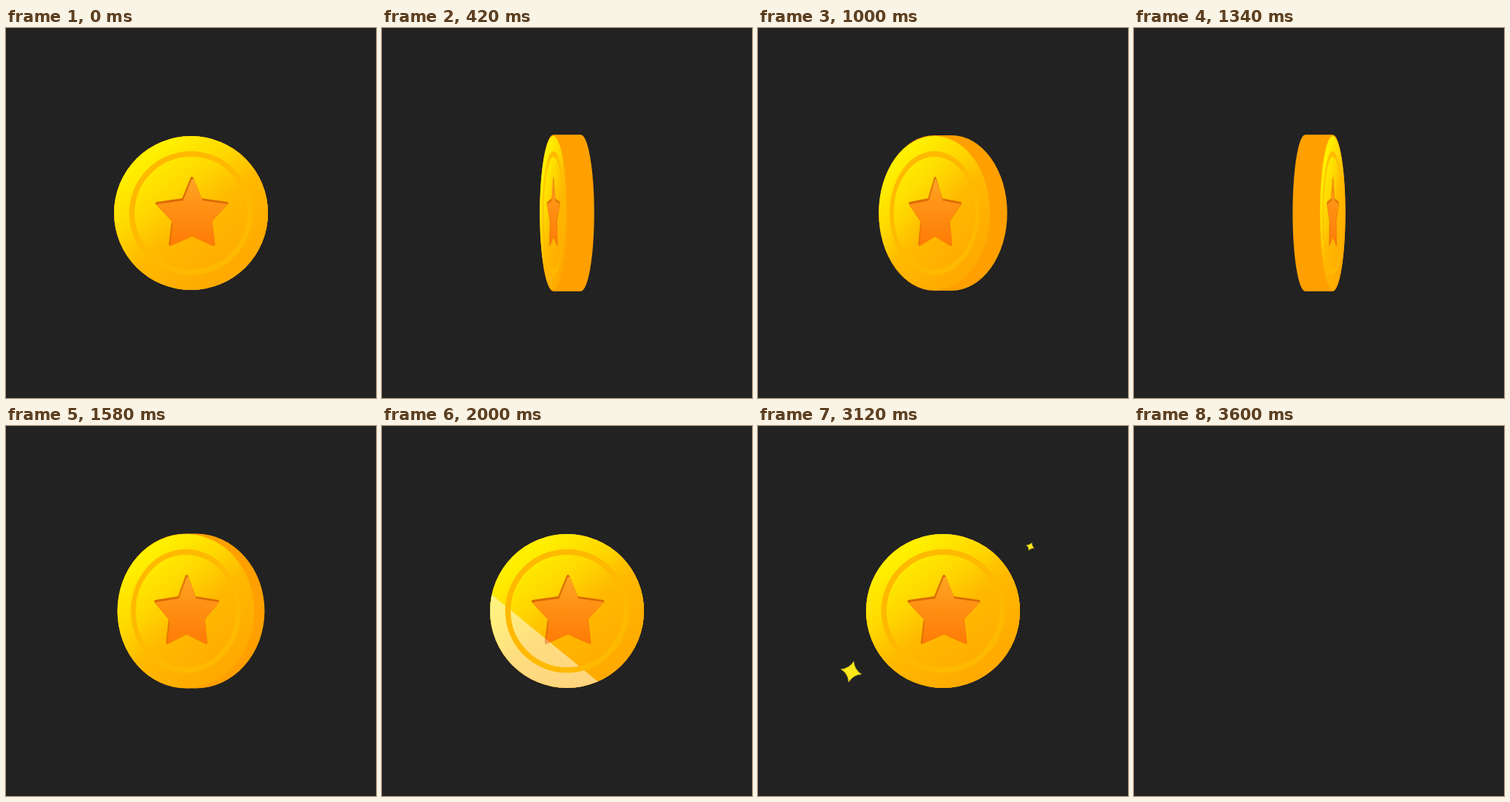
An HTML page without scripts that plays this animation: 500 by 500 pixels, repeating every 3.62 s.

```html
<!DOCTYPE html>
<html lang="en">
<head>
<meta charset="utf-8">
<title>Spinning coin</title>
<style>
  @property --turn {
    syntax: "<angle>";
    inherits: true;
    initial-value: 0deg;
  }

  html, body { margin: 0; width: 100%; height: 100%; overflow: hidden; background: #222; }
  svg { display: block; width: 100vw; height: 100vh; }

  #scene { animation: blink 3.62s step-end infinite; }

  #coin {
    --c: cos(var(--turn));
    --s: sin(var(--turn));
    --absC: max(var(--c), -1 * var(--c));
    --absS: max(var(--s), -1 * var(--s));
    /* half the visible thickness, and the side the face is on */
    --half: (18.9 * var(--absS) * (0.64 + 0.36 * var(--absS)));
    --side: clamp(-1, -9999 * var(--c) * var(--s), 1);
    --tall: (1 + 0.018 * var(--absS) * var(--absS));
    animation: spin 3.62s infinite;
  }
  .rim { fill: #ffa000; }
  .left  { transform: translateX(calc(-1px * var(--half))) scale(calc(var(--absC)), calc(var(--tall))); }
  .right { transform: translateX(calc(1px * var(--half))) scale(calc(var(--absC)), calc(var(--tall))); }
  .wall  { transform: scale(calc(var(--half)), calc(var(--tall))); }
  .face  { transform: translateX(calc(1px * var(--side) * var(--half))) scaleX(calc(var(--absC))); }

  .shine { fill: #fff; animation: sweep 3.62s infinite; }

  .spark { fill: #ffe81a; }
  #sparkA { animation: twinkleA 3.62s infinite; }
  #sparkB { animation: twinkleB 3.62s infinite; }

  @keyframes blink {
    0% { opacity: 1; }
    99.44%, 100% { opacity: 0; }
  }
  @keyframes spin {
    0% { --turn: 0deg; animation-timing-function: cubic-bezier(.2, 0, .8, 1); }
    48.62%, 100% { --turn: -540deg; }
  }
  @keyframes sweep {
    0%, 52.62% { transform: translateY(106px); animation-timing-function: cubic-bezier(.3, .15, .7, .85); }
    63.26%, 100% { transform: translateY(-176px); }
  }
  @keyframes twinkleA {
    0%, 64.92% { transform: rotate(0deg) scale(0); animation-timing-function: cubic-bezier(.1, .6, .3, 1); }
    77.35% { transform: rotate(14deg) scale(1); animation-timing-function: ease-in; }
    89.5%, 100% { transform: rotate(28deg) scale(0); }
  }
  @keyframes twinkleB {
    0%, 79% { transform: rotate(0deg) scale(0); animation-timing-function: cubic-bezier(.1, .6, .3, 1); }
    88.4% { transform: rotate(14deg) scale(1); animation-timing-function: ease-in; }
    93.92%, 100% { transform: rotate(28deg) scale(0); }
  }
</style>
</head>
<body>
<svg viewBox="0 0 500 500">
  <defs>
    <linearGradient id="gold" gradientUnits="userSpaceOnUse" x1="-57" y1="-76" x2="57" y2="76">
      <stop offset="0" stop-color="#fff000"/>
      <stop offset=".3" stop-color="#ffd800"/>
      <stop offset=".56" stop-color="#ffb900"/>
      <stop offset="1" stop-color="#ffaa00"/>
    </linearGradient>
    <linearGradient id="amber" gradientUnits="userSpaceOnUse" x1="0" y1="-48" x2="0" y2="45">
      <stop offset="0" stop-color="#ffa424"/>
      <stop offset=".45" stop-color="#ff8f12"/>
      <stop offset="1" stop-color="#ff7a06"/>
    </linearGradient>
    <path id="star" stroke-width="4" stroke-linejoin="round"
      d="M1.3-47 13-18 48.5-13 26.5 10.500 30.500 42.500 1.300 29.500-28 42.500-24 10.500-46-13-10.500-18Z"/>
    <path id="glint" d="M0-15Q3.500-3.500 15 0Q3.500 3.500 0 15Q-3.500 3.500-15 0Q-3.500-3.500 0-15Z"/>
    <clipPath id="disc"><circle r="104"/></clipPath>
    <mask id="hole" maskUnits="userSpaceOnUse" x="-60" y="-60" width="120" height="120">
      <use href="#star" fill="#fff" stroke="#fff"/>
    </mask>
  </defs>

  <g id="scene">
    <g transform="translate(250 250)">
      <g id="coin">
        <circle class="rim left" r="104"/>
        <circle class="rim right" r="104"/>
        <rect class="rim wall" x="-1" y="-104" width="2" height="208"/>

        <g class="face">
          <circle r="104" fill="url(#gold)"/>
          <g clip-path="url(#disc)">
            <g transform="rotate(39.3)">
              <rect class="shine" x="-120" width="240" height="70" opacity=".5"/>
            </g>
          </g>
          <circle r="79.8" fill="none" stroke="#ffb900" stroke-width="7.4"/>
          <use href="#star" fill="#dc6c04" stroke="#dc6c04"/>
          <g mask="url(#hole)">
            <use href="#star" x="1.2" y="3" fill="url(#amber)" stroke="url(#amber)"/>
            <g transform="rotate(39.3)">
              <rect class="shine" x="-120" width="240" height="70" opacity=".3"/>
            </g>
          </g>
        </g>
      </g>
    </g>

    <g transform="translate(368 163)"><use id="sparkA" class="spark" href="#glint"/></g>
    <g transform="translate(126 332)"><use id="sparkB" class="spark" href="#glint"/></g>
  </g>
</svg>
</body>
</html>
```
